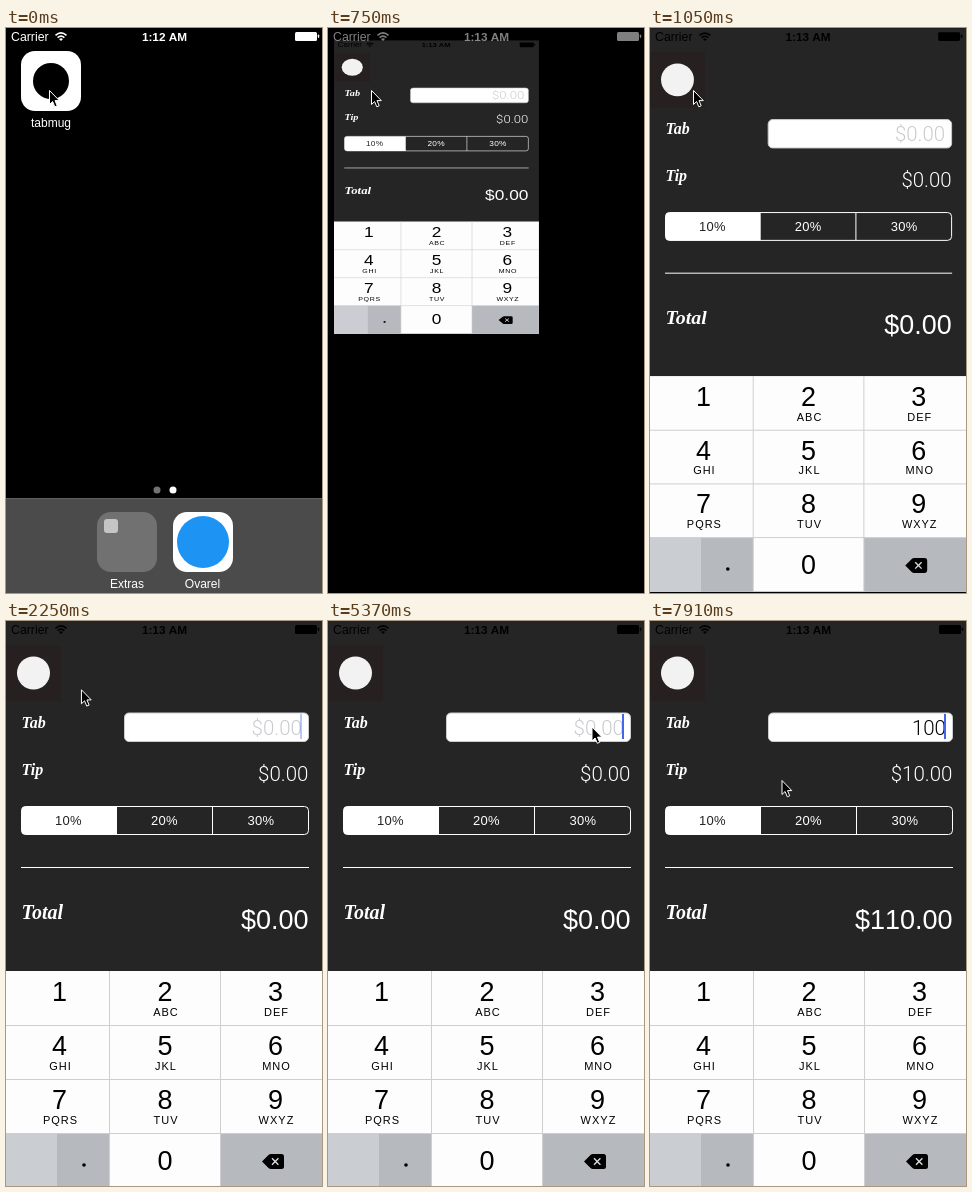
An HTML page that plays this animation: 316 by 565 pixels, repeating every 8 s.

```html
<!DOCTYPE html>
<html lang="en">
<head>
<meta charset="utf-8">
<title>Tip calculator</title>
<style>
  html, body { margin: 0; width: 100%; height: 100%; overflow: hidden; background: #000; }
  svg { display: block; width: 100vw; height: 100vh; }
  text { font-family: "Liberation Sans", Arial, sans-serif; font-kerning: none; }
  .label { font-size: 12px; fill: #fff; text-anchor: middle; }
  .clock { font-size: 11.8px; font-weight: bold; text-anchor: middle; }
  .heading { font: italic bold 16px "Liberation Serif", serif; fill: #fff; }
  .light { font: 300 20.5px Roboto, sans-serif; }
  .end { text-anchor: end; }
  .segment { font-size: 13px; letter-spacing: .3px; text-anchor: middle; }
  .digit { font-size: 27px; text-anchor: middle; }
  .letters { font-size: 11px; letter-spacing: 1px; text-anchor: middle; }
</style>
</head>
<body>
<svg viewBox="0 0 316 565">
  <defs>
    <g id="statusIcons">
      <text x="5" y="12.5" font-size="12.3">Carrier</text>
      <path d="M49.5 7.3Q55 2.6 60.5 7.3M51.6 9.6Q55 6.7 58.4 9.6" fill="none" stroke="currentColor" stroke-width="1.6"/>
      <path d="M53 11Q55 9.6 57 11L55 13Z"/>
      <rect x="289" y="4" width="22" height="9" rx="1.5"/>
      <rect x="311.8" y="6.5" width="1.4" height="3.5" rx=".7"/>
    </g>
  </defs>

  <rect width="316" height="565"/>

  <g id="home">
    <rect x="15" y="23" width="60" height="60" rx="14" fill="#fff"/>
    <circle cx="45" cy="53" r="18"/>
    <text class="label" x="45" y="99">tabmug</text>
    <circle cx="151" cy="462" r="3.5" fill="#737373"/>
    <circle cx="167" cy="462" r="3.5" fill="#fff"/>
    <rect y="470" width="316" height="95" fill="#4b4b4b"/>
    <rect y="470" width="316" height="1" fill="#606060"/>
    <rect x="91" y="484" width="60" height="60" rx="14" fill="#717171"/>
    <rect x="98" y="491" width="14" height="14" rx="3" fill="#c4c6c4"/>
    <text class="label" x="121" y="560">Extras</text>
    <rect x="167" y="484" width="60" height="60" rx="14" fill="#fff"/>
    <circle cx="197" cy="514" r="26" fill="#1d93f3"/>
    <text class="label" x="196.5" y="560">Ovarel</text>
  </g>

  <g id="app">
    <rect x="-1" width="320" height="567" fill="#252525"/>
    <use href="#statusIcons" color="#000"/>
    <text class="clock" x="158.5" y="12.5">1:13 AM</text>
    <rect y="24" width="55" height="56" fill="#272021"/>
    <circle cx="27.5" cy="52" r="16.5" fill="#f2f2f2"/>

    <text class="heading" x="15.5" y="106.5">Tab</text>
    <rect x="118.5" y="92" width="184" height="28.5" rx="4.5" fill="#fff" stroke="#ccc"/>
    <text id="amount" class="light end" x="296" y="114"></text>
    <rect id="caret" x="294" y="93" width="2" height="25" fill="#4566e6"/>

    <text class="heading" x="15.5" y="153.5">Tip</text>
    <text id="tip" class="light end" x="302.5" y="160" fill="#fff"></text>

    <path d="M111 185.500H19.500a4 4 0 0 0-4 4v20a4 4 0 0 0 4 4H111Z" fill="#fff"/>
    <rect x="15.5" y="185.5" width="287" height="28" rx="4" fill="none" stroke="#fff"/>
    <path d="M206.500 185.500v28M15 246.500H303" stroke="#fff"/>
    <text class="segment" x="62.5" y="204" fill="#252525">10%</text>
    <text class="segment" x="158.5" y="204" fill="#fff">20%</text>
    <text class="segment" x="255" y="204" fill="#fff">30%</text>

    <text class="heading" x="15.5" y="297.5" style="font-size:20px">Total</text>
    <text id="total" class="end" x="302.5" y="308" font-size="27" fill="#fff"></text>

    <rect x="-1" y="350" width="320" height="217" fill="#fdfdfd"/>
    <rect x="-1" y="512.5" width="52" height="54.5" fill="#cacdd2"/>
    <rect x="51" y="512.5" width="52.5" height="54.5" fill="#b6b9be"/>
    <rect x="214.5" y="512.5" width="104.5" height="54.5" fill="#b6b9be"/>
    <path d="M-1 404.500H319M-1 458.500H319M-1 512.500H319M103.500 350V567M214.500 350V567" stroke="#cfcfcf"/>
    <g id="keys"></g>
    <circle cx="78" cy="544" r="1.8"/>
    <path d="M256 540.500L262.500 534Q263.500 533 265 533H275.500Q278 533 278 535.500V545.500Q278 548 275.500 548H265Q263.500 548 262.500 547Z"/>
    <path d="M266 537.300l6.400 6.400m0-6.400l-6.400 6.400" stroke="#d8dade" stroke-width="1.4"/>
  </g>

  <g id="status" fill="#fff" color="#fff">
    <use href="#statusIcons"/>
    <text id="clock" class="clock" x="158.5" y="12.5"></text>
  </g>

  <path id="pointer" d="M.5 .5V14.500L3.600 11.500L5.800 16.800L8.200 15.800L6 10.600H10.300Z" stroke="#fff"/>
</svg>

<script>
const LOOP = 8000, STEP = 149; // the picture advances in even steps
const LAUNCH = 560, READY = 1300, TAP = 3200, REFOCUS = 4100, TYPING = 5800, LEAVE = 6900;
const KEY_TIMES = [TYPING, 6250, 6400];

const el = id => document.getElementById(id);
const [home, app, status, clock, pointer, caret, amount, tip, total] =
  ["home", "app", "status", "clock", "pointer", "caret", "amount", "tip", "total"].map(el);

const clamp = v => Math.min(1, Math.max(0, v));
const mix = (a, b, p) => a + (b - a) * p;
const between = (t, from, to) => t >= from && t < to;
const settle = (t, start) => 1 - Math.exp(-((Math.max(0, t - start) / 205) ** 2));
const easeOut = (t, from, to) => 1 - (1 - clamp((t - from) / (to - from))) ** 2;
const money = value => "$" + value.toFixed(2);

const letters = ["", "ABC", "DEF", "GHI", "JKL", "MNO", "PQRS", "TUV", "WXYZ"];
const keyX = [53.5, 159, 269.5];
el("keys").innerHTML = letters.map((name, i) => {
  const x = keyX[i % 3], y = 380 + 54 * Math.floor(i / 3);
  return `<text class="digit" x="${x}" y="${y}">${i + 1}</text>
    <text class="letters" x="${x + 1}" y="${y + 15}">${name}</text>`;
}).join("") + `<text class="digit" x="${keyX[1]}" y="549">0</text>`;

// The app grows out of its icon, sideways slightly ahead of downwards.
function drawLaunch(t) {
  const across = settle(t, LAUNCH), down = settle(t, LAUNCH + 24);
  const x = mix(15, 0, across), y = mix(23, 0, down);
  const w = mix(60, 319, across), h = mix(60, 567, down);
  const scale = w / 60, shown = clamp((t - LAUNCH) / 150);
  home.setAttribute("transform", `translate(${x - 15 * scale} ${y - 23 * scale}) scale(${scale})`);
  home.setAttribute("opacity", 1 - shown);
  app.setAttribute("transform", `translate(${x} ${y}) scale(${w / 319} ${h / 567})`);
  app.setAttribute("opacity", shown);
  status.setAttribute("opacity", t < LAUNCH ? 1 : clamp((994 - t) / 500));
  clock.textContent = t < LAUNCH ? "1:12 AM" : "1:13 AM";
}

function caretOpacity(t) {
  if (t < READY || between(t, TAP, REFOCUS)) return 0;
  if (between(t, TYPING, LEAVE)) return 1;
  const peak = t < TAP ? 1415 : t < TYPING ? 4395 : 6780;
  return clamp(.15 + .95 * Math.cos(2 * Math.PI * (t - peak) / (7 * STEP)));
}

function drawForm(t) {
  const tab = "100".slice(0, KEY_TIMES.filter(time => time <= t).length);
  amount.textContent = tab || money(0);
  amount.setAttribute("fill", tab ? "#000" : "#cbcbcf");
  tip.textContent = money(tab * .1);
  total.textContent = money(tab * 1.1);
  caret.setAttribute("opacity", caretOpacity(t));
}

function drawPointer(t) {
  const toField = easeOut(t, 2150, 3280), away = easeOut(t, LEAVE, 7900);
  const x = mix(mix(43, 263.5, toField), 131.5, away);
  const y = mix(mix(62, 105.5, toField), 159, away);
  pointer.setAttribute("transform", `translate(${x} ${y})`);
}

const start = performance.now();
function tick() {
  const elapsed = (performance.now() - start) % LOOP;
  const t = Math.floor(elapsed / STEP) * STEP;
  drawLaunch(t);
  drawForm(t);
  drawPointer(t);
  requestAnimationFrame(tick);
}
tick();
</script>
</body>
</html>
```
